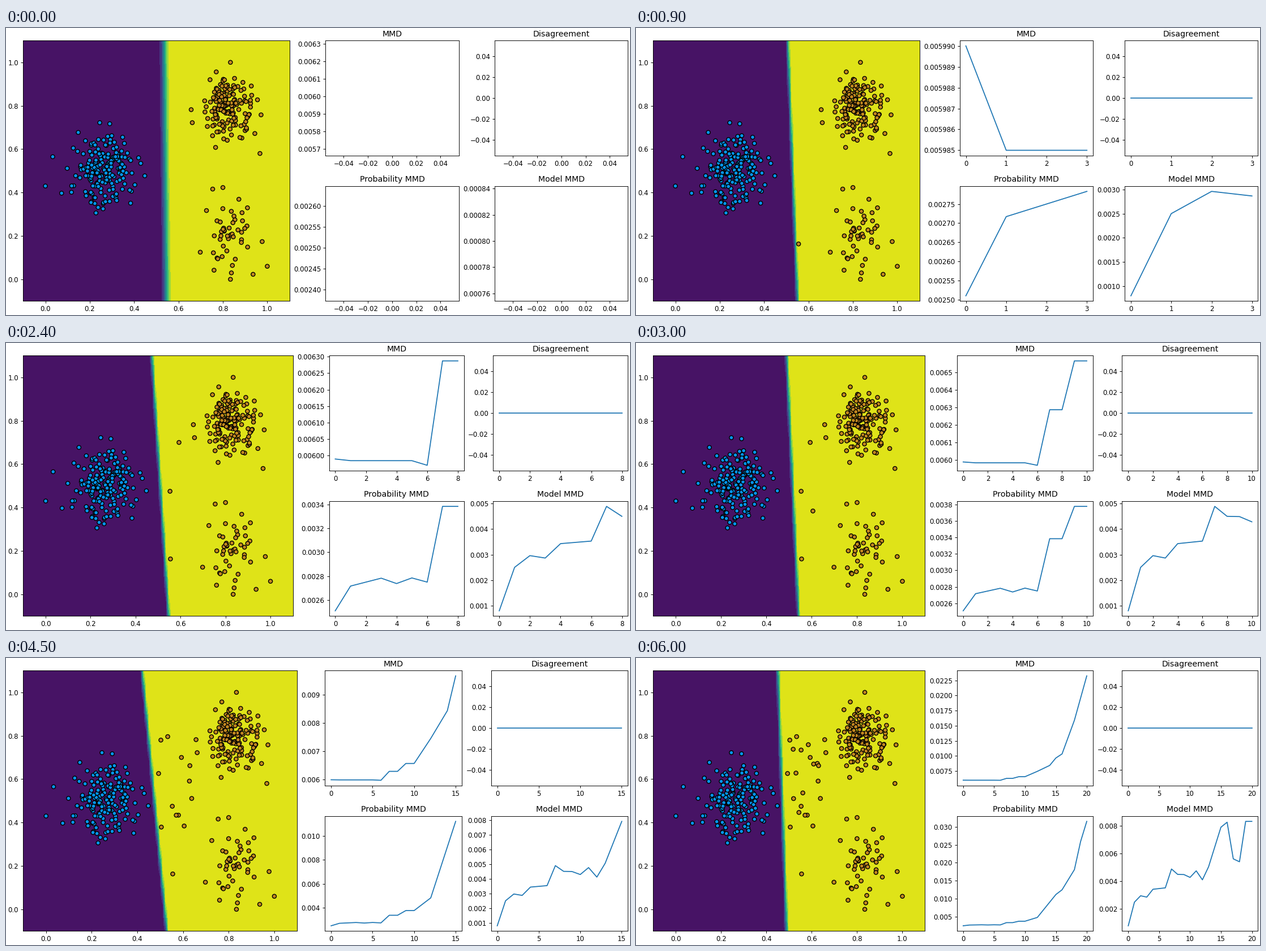
A matplotlib script that plays this animation: 1102x508 px, repeating every 6.3 s.

```python
import numpy as np
import matplotlib.pyplot as plt
from matplotlib.animation import FuncAnimation

W, H, DPI = 1102, 508, 84.75
STEPS, INTERVAL = 21, 300
LOW, HIGH = -.1, 1.1
BLUE, ORANGE = "#0594ec", "#c28720"

plt.rcParams["axes.titlepad"] = 6.7
rng = np.random.default_rng(12)

# A few outliers fix the outline of each cluster
LEFT_EDGE = [(0, .43), (.073, .397), (.033, .565), (.148, .677), (.245, .722),
             (.29, .717), (.348, .655), (.42, .56), (.448, .477), (.384, .351),
             (.26, .325), (.228, .306)]
TOP_EDGE = [(.834, 1), (.77, .956), (.742, .92), (.928, .891), (.657, .782),
            (.662, .722), (.767, .608), (.944, .672), (.972, .758), (.967, .58)]
BOTTOM_EDGE = [(.754, .416), (.8, .423), (.872, .369), (.726, .317), (.977, .174),
               (1, .06), (.936, .023), (.834, 0), (.76, .042), (.698, .125)]

# Left-cluster points that jump into the gap, in order of arrival
LANDINGS = [(.555, .163), (.593, .70), (.553, .475), (.605, .384), (.63, .662),
            (.58, .434), (.503, .78), (.533, .796), (.638, .511), (.493, .626),
            (.505, .379)]
ARRIVALS = [1, 7, 7, 9, 11, 12, 12] + [13 + i // 2 for i in range(15)]

# Decision boundary at key steps: x on the top edge, x on the bottom edge
BORDER_KEYS = [0, 1, 3, 6, 7, 10, 12, 15, 17, 20]
TOP_X = [.536, .520, .507, .515, .465, .490, .492, .4217, .445, .451]
BOTTOM_X = [.546, .550, .551, .5675, .550, .5425, .558, .5295, .505, .490]

# Turning points of each curve: steps, values in thousandths
CURVES = {
    "MMD": (
        [0, 1, 5, 6, 7, 8, 9, 10, 12, 14, 15, 16, 18, 20],
        [5.99, 5.985, 5.985, 5.971, 6.287, 6.287, 6.565, 6.565, 7.45, 8.43,
         9.66, 10.33, 15.9, 23.24]),
    "Disagreement": ([0, 20], [0, 0]),
    "Probability MMD": (
        [0, 1, 3, 4, 5, 6, 7, 8, 9, 10, 12, 15, 16, 18, 19, 20],
        [2.51, 2.717, 2.783, 2.738, 2.785, 2.75, 3.384, 3.384, 3.776, 3.776,
         4.83, 11.19, 12.5, 18.1, 25.9, 31.5]),
    "Model MMD": (
        [0, 1, 2, 3, 4, 6, 7, 8, 9, 10, 11, 12, 13, 15, 16, 17, 18, 19, 20],
        [.798, 2.5, 2.96, 2.865, 3.43, 3.53, 4.89, 4.5, 4.49, 4.285, 4.757,
         4.11, 5.05, 7.9, 8.26, 5.62, 5.41, 8.32, 8.32]),
}
series = {title: np.interp(range(STEPS), keys, values) * 1e-3
          for title, (keys, values) in CURVES.items()}


def cloud(n, center, spread, edge):
    """Bell-shaped cluster without stray points, plus its given outliers."""
    pts = rng.normal(size=(n * 3, 2))
    pts = pts[np.hypot(*pts.T) < 2.2][:n]
    return np.vstack([edge, pts * spread + center])


left = cloud(185, (.255, .5), (.082, .078), LEFT_EDGE)
top = cloud(145, (.825, .79), (.062, .071), TOP_EDGE)
bottom = cloud(40, (.84, .185), (.06, .085), BOTTOM_EDGE)

strays = rng.uniform((.5, .35), (.64, .77), (len(ARRIVALS) - len(LANDINGS), 2))
landings = np.vstack([LANDINGS, strays])
jumpers = rng.choice(np.arange(len(LEFT_EDGE), len(left)), len(ARRIVALS), replace=False)

axis = np.linspace(LOW, HIGH, 101)
gx, gy = np.meshgrid(axis, axis)


def boundary(k, y):
    ends = [np.interp(k, BORDER_KEYS, xs) for xs in (BOTTOM_X, TOP_X)]
    return np.interp(y, [LOW, HIGH], ends)


def probability(k):
    width = .0085 if k == 0 else .003
    z = np.clip((gx - boundary(k, gy)) / width, -30, 30)
    return 1 / (1 + np.exp(-z))


def points_at(k):
    moved = left.copy()
    here = np.array(ARRIVALS) <= k
    moved[jumpers[here]] = landings[here]
    return np.vstack([moved, top, bottom])


fig = plt.figure(figsize=((W + 1e-6) / DPI, (H + 1e-6) / DPI), dpi=DPI,
                 layout="constrained")
grid = fig.add_gridspec(2, 3, width_ratios=[2, 1, 1])
field = fig.add_subplot(grid[:, 0])
charts = [fig.add_subplot(grid[r, c]) for r in (0, 1) for c in (1, 2)]


def draw(k):
    field.clear()
    field.contourf(gx, gy, probability(k), levels=np.linspace(0, 1, 11))
    pts = points_at(k)
    is_left = pts[:, 0] < boundary(k, pts[:, 1])
    field.scatter(*pts.T, c=np.where(is_left, BLUE, ORANGE), edgecolors="k",
                  linewidths=1.2)
    field.set(xlim=(LOW, HIGH), ylim=(LOW, HIGH))
    for ax, (title, values) in zip(charts, series.items()):
        ax.clear()
        ax.plot(range(k + 1), values[:k + 1])
        ax.set_title(title)


anim = FuncAnimation(fig, draw, frames=STEPS, init_func=lambda: None,
                     interval=INTERVAL, repeat=True, repeat_delay=0)
plt.show()
```
